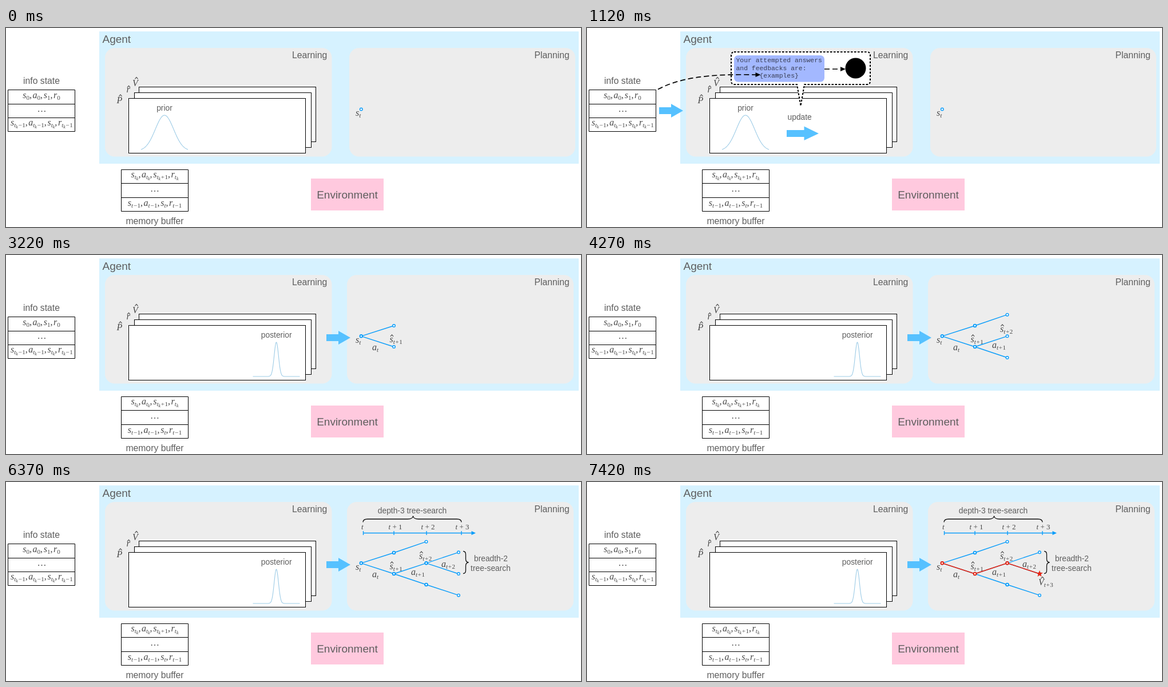
An HTML page for the animation above (8 s loop, 1005 px wide and 349 px high).

```html
<!DOCTYPE html>
<html lang="en">
<head>
<meta charset="utf-8">
<title>Agent learning and planning</title>
<style>
html, body { margin: 0; width: 100%; height: 100%; overflow: hidden; background: #fff; }
svg { display: block; width: 1005px; height: 349px; }
text { font: 13.8px "Liberation Sans", Arial, sans-serif; fill: #5e5e5e; }
text.h1 { font-size: 19px; }
text.h2 { font-size: 15.75px; }
text.code { font: 11.4px "Liberation Mono", monospace; fill: #3a3f55; white-space: pre; }
text.math, text.num { font: italic 16px "Liberation Serif", serif; fill: #484848; }
text.num { font-size: 13px; }
.up { font-style: normal; }
.mid { text-anchor: middle; }
.box { fill: #fff; stroke: #000; stroke-width: 1; }
.hat { fill: none; stroke: #484848; stroke-width: 1.1; }
.bell { fill: none; stroke: #9ccbe6; stroke-width: 1.1; }
.arrow { fill: #56c1ff; }
.dash { fill: none; stroke: #000; stroke-width: 1.7; stroke-dasharray: 9 5; }
.brace { fill: none; stroke: #111; stroke-width: 1.3; }
.tree { fill: none; stroke: #0a9dfa; stroke-width: 1.4; }
.tree circle { fill: #fff; }
.tree .in { stroke-width: 1.8; }
.red { stroke: #ee220c; stroke-width: 1.5; }

/* step changes of the 8 s loop */
.step { animation: 8s step-end infinite; visibility: hidden; }
.s0 { animation-name: start; }
.s1 { animation-name: update; }
.s2 { animation-name: post; }
.s3 { animation-name: plan1; }
.s4 { animation-name: plan2; }
.s5 { animation-name: plan3; }
.s6 { animation-name: notes; }
.s7 { animation-name: best; }
@keyframes start { 0% { visibility: visible } 40.25%, 100% { visibility: hidden } }
@keyframes update { 0% { visibility: hidden } 14% { visibility: visible } 40.25%, 100% { visibility: hidden } }
@keyframes post { 0% { visibility: hidden } 27.125%, 100% { visibility: visible } }
@keyframes plan1 { 0% { visibility: hidden } 40.25%, 100% { visibility: visible } }
@keyframes plan2 { 0% { visibility: hidden } 53.375%, 100% { visibility: visible } }
@keyframes plan3 { 0% { visibility: hidden } 66.5%, 100% { visibility: visible } }
@keyframes notes { 0% { visibility: hidden } 79.625%, 100% { visibility: visible } }
@keyframes best { 0% { visibility: hidden } 92.75%, 100% { visibility: visible } }
</style>
</head>
<body>
<svg viewBox="0 0 1005 349">
  <defs>
    <path id="hat" class="hat" d="M-2.6 1.4L0 -1.6L2.6 1.4"/>
    <path id="arrow" class="arrow" d="M0 -6H21V-12L42 0L21 12V6H0Z"/>
    <path id="tip" d="M0 0L-9 -4V4Z"/>
  </defs>

  <!-- agent and panels -->
  <rect x="163" y="6" width="838" height="232" fill="#d6f2ff"/>
  <rect x="173" y="35" width="396.5" height="190.5" rx="17" fill="#ededed"/>
  <rect class="step s0" x="600" y="35" width="395" height="190.5" rx="17" fill="#ededed"/>
  <rect class="step s3" x="596" y="35" width="396" height="190.5" rx="17" fill="#ededed"/>
  <text class="h1" x="168.5" y="26">Agent</text>
  <text class="h2" x="500" y="52.5">Learning</text>
  <text class="h2" x="923.5" y="52.5">Planning</text>

  <rect x="533" y="264" width="127" height="56" fill="#ffc9de"/>
  <text class="h1 mid" x="596.5" y="298.5">Environment</text>

  <!-- tables -->
  <text class="h2 mid" x="62" y="98">info state</text>
  <path class="box" d="M3.5 108.5H120.5V181.5H3.5ZM3.5 133.5H120.5M3.5 157.5H120.5"/>
  <text class="math mid" x="62" y="123">s:0,a:0,s:1,r:0</text>
  <text class="math mid" x="62.5" y="146.5">…</text>
  <text class="math mid" x="62.3" y="170.5">s:tk-1,a:tk-1,s:tk,r:tk-1</text>

  <path class="box" d="M201.5 248.5H318.5V321.5H201.5ZM201.5 272.5H318.5M201.5 297.5H318.5"/>
  <text class="math mid" x="260" y="262">s:tk,a:tk,s:tk+1,r:tk</text>
  <text class="math mid" x="260" y="286.5">…</text>
  <text class="math mid" x="260" y="311.5">s:t-1,a:t-1,s:t,r:t-1</text>
  <text class="h2 mid" x="260" y="344">memory buffer</text>

  <!-- model cards -->
  <rect class="box" x="232.5" y="103.5" width="309" height="96"/>
  <rect class="box" x="224.5" y="113.5" width="309" height="96"/>
  <rect class="box" x="214.5" y="123.5" width="309" height="96"/>
  <text class="math" x="193.5" y="132">P</text><use href="#hat" x="200" y="118.5"/>
  <text class="math" x="210.5" y="113">r</text><use href="#hat" x="214.5" y="103"/>
  <text class="math" x="221" y="101.5">V</text><use href="#hat" x="228" y="88"/>

  <g class="step s0">
    <text class="mid" x="277" y="144.5">prior</text>
    <path class="bell" data-mid="277" data-sd="16" data-base="215.5"/>
  </g>

  <g class="step s2">
    <text class="mid" x="472.7" y="144.5">posterior</text>
    <path class="bell" data-mid="472.5" data-sd="3.8" data-base="213"/>
  </g>

  <!-- prompt and update -->
  <g class="step s1">
    <use href="#arrow" x="126" y="145"/>
    <path class="arrow" d="M349 179H379.500V172.500L405 185L379.500 197V191H349Z"/>
    <text class="mid" x="371.7" y="160.500">update</text>
    <path d="M257 42H489Q495 42 495 48V93Q495 99 489 99H380L373.500 136.500L367 99H258Q252 99 252 93V48Q252 42 258 42Z"
      fill="#fff" stroke="#000" stroke-width="2" stroke-dasharray="3.5 2.500"/>
    <rect x="257" y="48" width="158" height="46.500" rx="7" fill="#a3b8ff"/>
    <text class="code" x="260.500" y="60">Your attempted answers</text>
    <text class="code" x="260.500" y="74">and feedbacks are:</text>
    <text class="code" x="301.500" y="86.500">{examples}</text>
    <circle cx="469.500" cy="70.500" r="18"/>
    <path class="dash" d="M124 107.500C160 89 205 80 296 82"/>
    <use href="#tip" x="303.500" y="82"/>
    <path class="dash" d="M415 72H445"/>
    <use href="#tip" x="452" y="72"/>
  </g>

  <!-- search tree -->
  <g class="tree">
    <circle class="step s0" cx="620.8" cy="142.500" r="2.3"/>
    <g class="step s3" data-edges="0-1 0-2"></g>
    <g class="step s4" data-edges="1-3 2-4 2-5"></g>
    <g class="step s5" data-edges="4-6 4-7 5-8"></g>
    <g class="step s7 red" data-edges="0-2 2-4 4-7"></g>
  </g>
  <text class="math" x="611" y="153.500">s:t</text>
  <g class="step s3">
    <use href="#arrow" x="560" y="145"/>
    <text class="math" x="640" y="167">a:t</text>
    <text class="math" x="670.500" y="153">s:t+1</text><use href="#hat" x="674.500" y="141.500"/>
  </g>
  <g class="step s4">
    <text class="math" x="708" y="163">a:t+1</text>
    <text class="math" x="722" y="135">s:t+2</text><use href="#hat" x="726" y="123.500"/>
  </g>
  <g class="step s5">
    <text class="math" x="761" y="149">a:t+2</text>
  </g>

  <!-- depth and breadth -->
  <g class="step s6">
    <text class="mid" x="710" y="55">depth-3 tree-search</text>
    <path class="brace" d="M624 70.500Q624 65 632 65H702Q711 65 711.500 59.500Q712 65 721 65H788Q796 65 796 70.500"/>
    <path class="tree" d="M624 89.500H815M624.500 86V93M678 86V93M735 86V93M796 86V93"/>
    <path d="M821 89.500L813.500 86V93Z" fill="#0a9dfa"/>
    <text class="num" x="621" y="83">t</text>
    <text class="num mid" x="680.500" y="83">t <tspan class="up">+ 1</tspan></text>
    <text class="num mid" x="737.500" y="83">t <tspan class="up">+ 2</tspan></text>
    <text class="num mid" x="797.500" y="83">t <tspan class="up">+ 3</tspan></text>
    <path class="brace" d="M799 121.500Q803.500 121.500 803.500 127V135Q803.500 140.500 808.500 141Q803.500 141.500 803.500 147V155Q803.500 160.500 799 160.500"/>
    <text class="mid" x="847.500" y="139">breadth-2</text>
    <text class="mid" x="847" y="156">tree-search</text>
  </g>

  <g class="step s7">
    <path transform="translate(791 161)" fill="#ee220c"
      d="M0 -6.2L1.4 -1.9L5.9 -1.9L2.3 .8L3.6 5L0 2.4L-3.6 5L-2.3 .8L-5.9 -1.9L-1.4 -1.9Z"/>
    <text class="math" x="789" y="181">V:t+3</text><use href="#hat" x="796" y="168"/>
  </g>
</svg>
<script>
const SVG = 'http://www.w3.org/2000/svg';

function add(parent, tag, attrs, text = '') {
  const el = document.createElementNS(SVG, tag);
  for (const key in attrs) el.setAttribute(key, attrs[key]);
  el.textContent = text;
  return parent.appendChild(el);
}

// "s:tk-1,a:t" becomes symbols with subscripts; k sits one level lower
function typeset(el) {
  const terms = el.textContent.split(',');
  let level = 0;
  const put = (ch, depth, size, dx = 0) => {
    add(el, 'tspan', {
      dx, dy: depth - level, style: `font-size:${size}px`,
      class: /[a-z]/i.test(ch) ? '' : 'up'
    }, ch);
    level = depth;
  };
  el.textContent = '';
  terms.forEach((term, i) => {
    const [base, sub = ''] = term.split(':');
    put(base, 0, 16, i ? 1.6 : 0);
    let gap = 0;
    for (const ch of sub) {
      const sign = ch === '-' || ch === '+';
      if (ch === 'k') put(ch, 5, 8);
      else put(ch === '-' ? '−' : ch, 3, 11, sign ? 0.6 : gap);
      gap = sign ? 0.6 : 0;
    }
    if (i < terms.length - 1) put(',', 0, 16);
  });
}

function drawBell(path) {
  const { mid, sd, base } = path.dataset;
  const points = [];
  for (let x = -41; x <= 41; x += 0.5) {
    const y = base - (base - 153) * Math.exp(-x * x / (2 * sd * sd));
    points.push(`${+mid + x} ${y.toFixed(2)}`);
  }
  path.setAttribute('d', 'M' + points.join('L'));
}

const nodes = [
  [620.8, 142.3], [678, 124], [678, 161], [734.5, 104.700], [734.5, 142.3],
  [734.5, 180], [791, 123.3], [791, 161], [791, 198.700]
];

function drawTree(group) {
  const edges = group.dataset.edges.split(' ').map(e => e.split('-'));
  const ring = (i, cls) => add(group, 'circle', { cx: nodes[i][0], cy: nodes[i][1], r: 2.3, class: cls });
  for (const [a, b] of edges) add(group, 'path', { d: `M${nodes[a]}L${nodes[b]}` });
  if (!group.matches('.red')) edges.forEach(e => ring(e[1], ''));
  new Set(edges.map(e => e[0])).forEach(i => ring(i, 'in'));
}

document.querySelectorAll('.math').forEach(typeset);
document.querySelectorAll('.bell').forEach(drawBell);
document.querySelectorAll('[data-edges]').forEach(drawTree);
</script>
</body>
</html>
```
